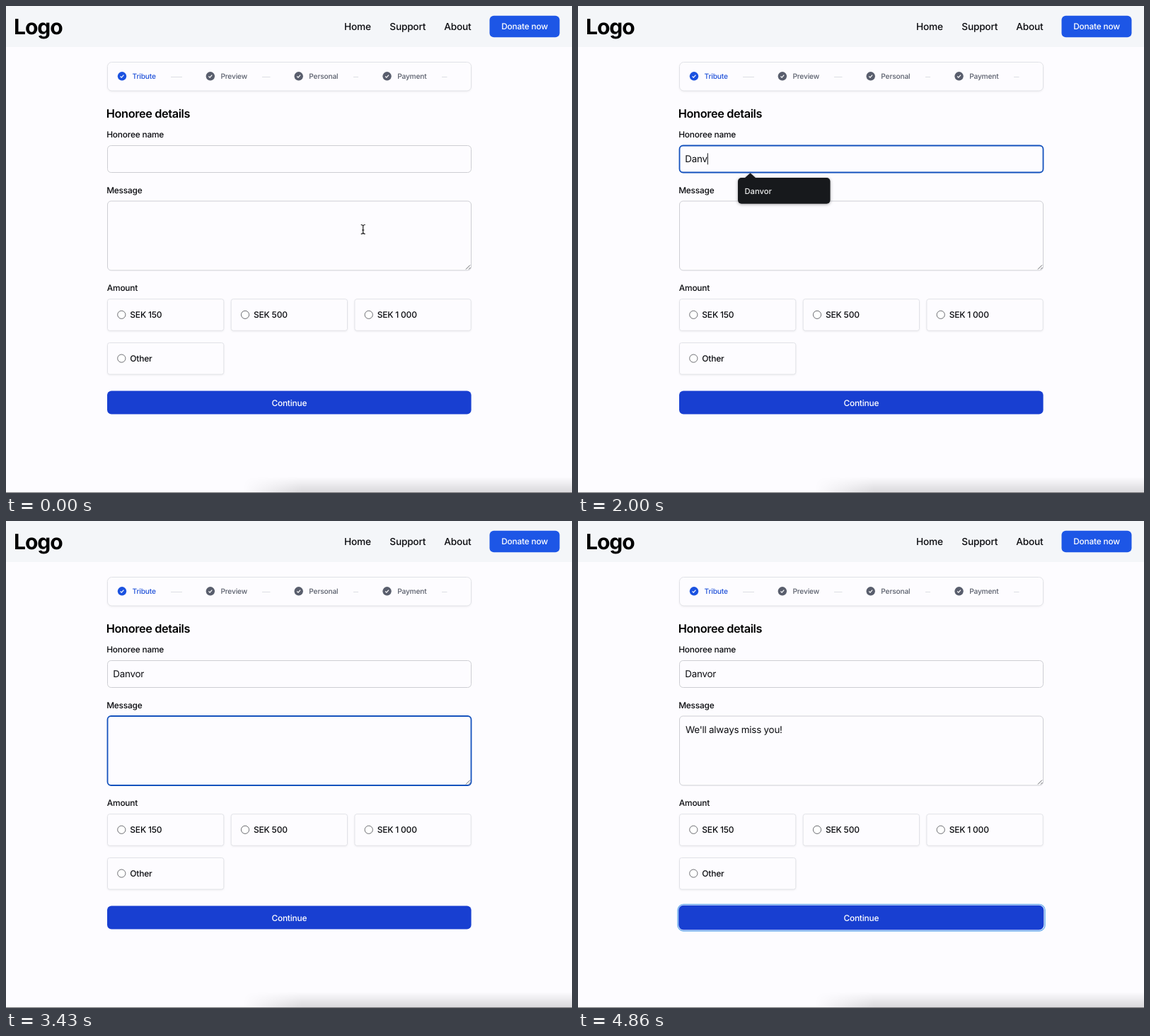
Animation of 800 by 689 pixels, one loop 5000 ms. Source, as an HTML page:

```html
<!DOCTYPE html>
<html lang="en">
<head>
<meta charset="utf-8">
<title>Tribute form</title>
<style>
  html, body { margin: 0; width: 100%; height: 100%; overflow: hidden; background: #fdfcff; }
  svg { display: block; width: 800px; height: 689px; }
  text {
    font: 500 11.9px Inter, "Liberation Sans", sans-serif;
    letter-spacing: -.017em;
    text-rendering: geometricPrecision;
    white-space: pre;
    fill: #0a0b0f;
  }
  .logo { font-size: 30px; font-weight: 700; letter-spacing: -1px; fill: #000; }
  .nav { font-size: 13.7px; }
  .title { font-size: 16.3px; font-weight: 600; letter-spacing: -.023em; fill: #000; }
  .step { font-size: 10.2px; fill: #595e6b; }
  .step.on { fill: #1d4fd8; }
  .option { font-size: 12px; }
  .typed { font-size: 13.4px; font-weight: 400; }
  .button { fill: #fff; text-anchor: middle; }
  .tip { font-size: 11.2px; letter-spacing: 0; fill: #eceded; }
  .field { fill: #fdfcff; stroke: #cdced3; }
  .field.focus { stroke: #1552bd; stroke-width: 1.8; }
  .card { fill: #fdfcff; stroke: #e1e2e7; }
  .soft { filter: drop-shadow(0 1px 1px rgba(0, 0, 0, .06)); }
  .radio { fill: #fff; stroke: #6c6d72; }
</style>
</head>
<body>
<svg viewBox="0 0 800 689">
  <defs>
    <linearGradient id="down" x2="0" y2="1">
      <stop offset="0" stop-opacity="0"/>
      <stop offset="1" stop-opacity=".14"/>
    </linearGradient>
    <linearGradient id="across">
      <stop offset="0" stop-color="#fff" stop-opacity="0"/>
      <stop offset=".18" stop-color="#fff"/>
    </linearGradient>
    <mask id="fade"><rect x="335" y="660" width="465" height="29" fill="url(#across)"/></mask>
  </defs>

  <rect width="800" height="689" fill="#fdfcff"/>
  <rect width="800" height="58" fill="#f4f6f9"/>
  <text class="logo" x="11" y="40">Logo</text>
  <text class="nav" x="478" y="33.8">Home</text>
  <text class="nav" x="542.3" y="33.8">Support</text>
  <text class="nav" x="619.3" y="33.8">About</text>
  <rect x="683.5" y="13.7" width="99" height="30.6" rx="6" fill="#1d56e6"/>
  <text class="button" x="733" y="33.4">Donate now</text>

  <rect class="card soft" x="143.5" y="79.5" width="514" height="40.5" rx="6"/>
  <g id="steps"></g>

  <text class="title" x="141.8" y="158.2">Honoree details</text>
  <text x="142.2" y="186.2">Honoree name</text>
  <rect id="nameBox" class="field" x="143.5" y="197.5" width="514" height="38" rx="5"/>
  <text id="name" class="typed" x="151.3" y="221.2"></text>
  <text x="142.2" y="264.6">Message</text>
  <rect id="noteBox" class="field" x="143.5" y="276" width="514" height="98" rx="5"/>
  <path d="M650 372.5l6-6M654 372.5l2.5-2.5" stroke="#55565a" stroke-width=".9"/>
  <text id="note" class="typed" x="152" y="300"></text>
  <rect id="caret" width="1" height="16" fill="#15161a"/>

  <text x="142.8" y="403.3">Amount</text>
  <g id="options"></g>

  <rect id="ring" x="141" y="542.6" width="519" height="37.3" rx="8" fill="#fff" stroke="#6faeee" stroke-width="1.5"/>
  <rect id="go" x="143" y="544.6" width="514.6" height="33" rx="6" fill="#183fd1" stroke="#183fd1" stroke-width="0"/>
  <text class="button" x="400.3" y="565.5">Continue</text>

  <g id="tip" style="filter:drop-shadow(0 1px 2px rgba(0,0,0,.35))">
    <path d="M235.5 243.5l8-7.2 8 7.2z" fill="#17191c"/>
    <rect x="226" y="243" width="130.5" height="36.8" rx="5" fill="#17191c"/>
    <text class="tip" x="235.5" y="265.6">Danvor</text>
  </g>

  <rect x="335" y="666" width="465" height="22" fill="url(#down)" mask="url(#fade)"/>
  <rect y="688" width="800" height="1" fill="#747477"/>

  <path id="beam" d="M-3-6.5Q0-6.5 0-4.5Q0-6.5 3-6.5M0-5V5M-3 6.5Q0 6.5 0 4.5Q0 6.5 3 6.5M-1.6 1H1.6" fill="none" stroke="#111" stroke-width="1.1"/>
  <path id="arrow" d="M0 0V12L2.8 9.4 4.6 13.6 6.5 12.8 4.7 8.7H8.5Z" fill="#000" stroke="#fff" stroke-width=".9"/>
</svg>
<script>
  const $ = id => document.getElementById(id);
  const show = (id, on) => $(id).setAttribute("visibility", on ? "visible" : "hidden");
  const place = (id, x, y) => $(id).setAttribute("transform", `translate(${x} ${y})`);

  const NAME = "Danvor";
  const NOTE = "We'll always miss you!";
  const LOOP = 5000, RATE = 7;
  const NOTE_STOPS = [5, 12, 17, NOTE.length];

  $("steps").innerHTML = [["Tribute", 233, 16], ["Preview", 362, 11.5], ["Personal", 491, 7], ["Payment", 616, 7.5]]
    .map(([label, x, w], i) => {
      const cx = 164 + i * 124.85;
      return `<circle cx="${cx}" cy="99.3" r="6.2" fill="${i ? "#595e6d" : "#1b52e0"}"/>
        <path d="M${cx - 2.4} 99.5l1.7 1.7 3.1-3.6" fill="none" stroke="#fff" stroke-width="1.2"/>
        <text class="step ${i ? "" : "on"}" x="${cx + 14.6}" y="103">${label}</text>
        <path d="M${x} 100.5h${w}" stroke="#dcdee3"/>`;
    }).join("");

  $("options").innerHTML = ["SEK 150", "SEK 500", "SEK 1 000", "Other"].map((label, i) => {
    const x = 143.5 + i % 3 * 174.7, y = i < 3 ? 414.7 : 476.5;
    const mark = i ? "" : `<g id="pick"><rect x="155.8" y="428.9" width="14.9" height="16" rx="2" fill="#8fbdf2" stroke="#1551c6" stroke-width="2.2"/></g>`;
    return `<rect class="card soft" x="${x}" y="${y}" width="164.3" height="44.6" rx="3"/>${mark}
      <circle class="radio" cx="${x + 19.8}" cy="${y + 22.1}" r="5.6"/>
      <text class="option" x="${x + 31.8}" y="${y + 26.4}">${label}</text>`;
  }).join("");

  function drawPointer(tick) {
    const p = Math.min(tick / 5, 1), e = p * p * (3 - 2 * p);
    const x = 504.7 - 189 * e, y = 316 - 100 * e;
    const inGap = y > 236 && y < 276, on = tick < 11;
    place("beam", x, y);
    place("arrow", x, y);
    show("beam", on && !inGap);
    show("arrow", on && inGap);
  }

  function drawCaret(inName, inNote, tick) {
    const field = $(inName ? "name" : "note");
    const x = field.textContent ? +field.getAttribute("x") + field.getComputedTextLength() : 152.2;
    $("caret").setAttribute("x", x);
    $("caret").setAttribute("y", inName ? 208.3 : 286.8);
    show("caret", inName && tick !== 10 || inNote && !(tick > 20 && tick < 25));
  }

  function draw(t) {
    const tick = Math.floor((t + 4) * RATE / 1000);
    const inName = tick >= 6 && tick < 18, inNote = tick >= 18 && tick < 31;

    $("name").textContent = NAME.slice(0, Math.max(0, tick - 10));
    $("note").textContent = tick < 25 ? "" : NOTE.slice(0, NOTE_STOPS[Math.min(tick - 25, 3)]);
    $("nameBox").classList.toggle("focus", inName);
    $("noteBox").classList.toggle("focus", inNote);
    show("tip", tick >= 7 && tick < 18);
    show("pick", tick >= 31 && tick < 33);

    const glow = Math.min(Math.max(tick - 32, 0) / 2, 1);
    $("ring").setAttribute("opacity", glow);
    $("go").setAttribute("stroke-width", 1.6 * glow);

    drawPointer(tick);
    drawCaret(inName, inNote, tick);
  }

  function frame() {
    draw(Math.min(performance.now() % LOOP, LOOP - 5));
    requestAnimationFrame(frame);
  }
  frame();
</script>
</body>
</html>
```
